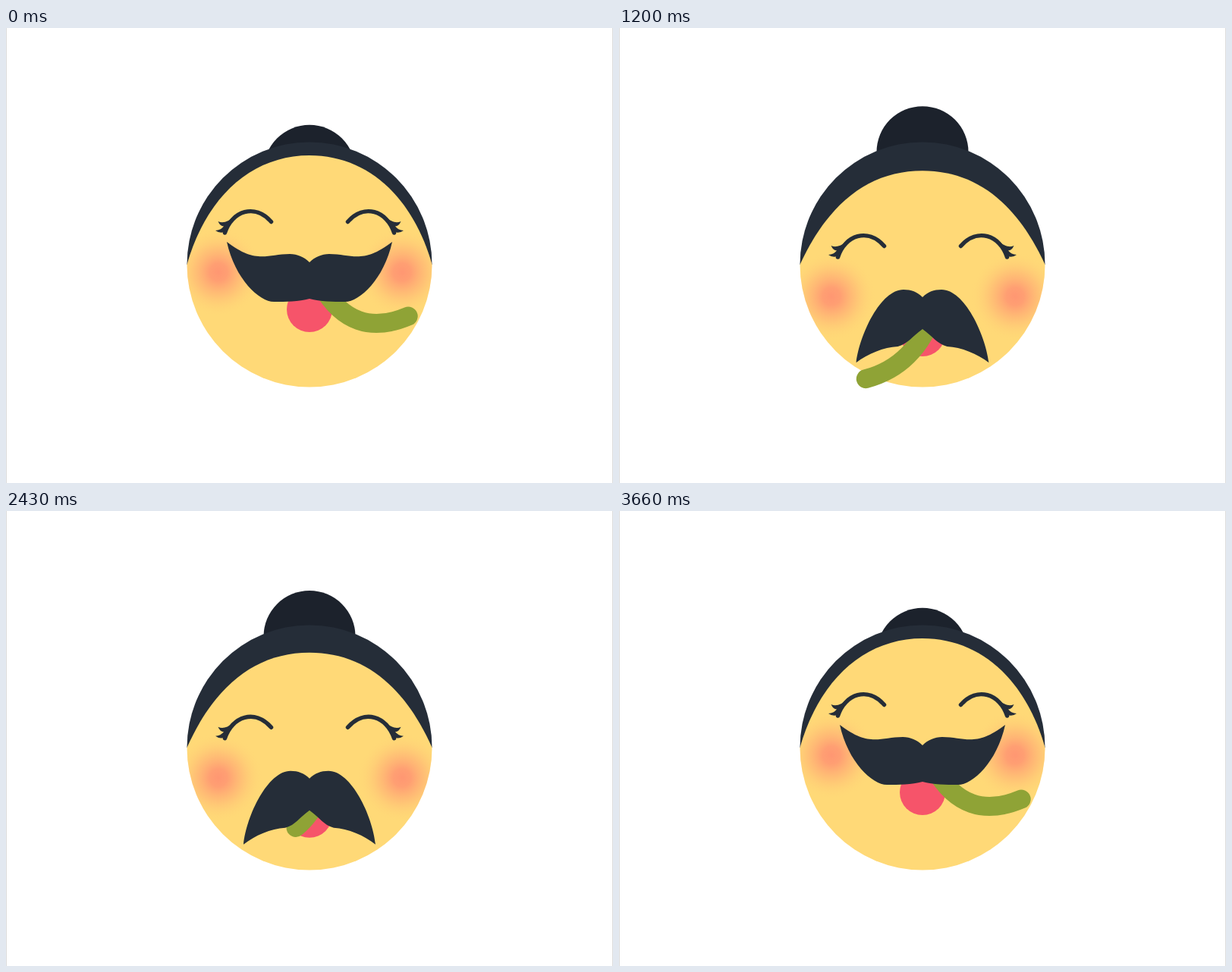
An HTML page for the animation above (3.69 s loop, 800x600 px).

```html
<!DOCTYPE html>
<html lang="en">
<head>
<meta charset="utf-8">
<title>Moustache face</title>
<style>
html, body { margin: 0; width: 100%; height: 100%; overflow: hidden; background: #fff; }
svg { display: block; width: 800px; height: 600px; }
</style>
</head>
<body>
<svg viewBox="0 0 800 600">
  <defs>
    <radialGradient id="glow">
      <stop offset="0" stop-color="#ff9772"/>
      <stop offset=".2" stop-color="#ff9772" stop-opacity=".88"/>
      <stop offset=".55" stop-color="#ffa573" stop-opacity=".42"/>
      <stop offset="1" stop-color="#ffd977" stop-opacity="0"/>
    </radialGradient>
    <clipPath id="skinClip"><path id="skinEdge"/></clipPath>
    <g id="eye">
      <path d="M288.500 270C298 241 328 231 349.500 255.500" fill="none" stroke="#252d38" stroke-width="5.500" stroke-linecap="round"/>
      <path d="M299 250Q288 259 279.500 255Q282 261 287 261.500Q283 266.500 276 267Q281 271 288 269Z" fill="#252d38"/>
    </g>
  </defs>
  <path d="M.5 0V600M799.500 0V600" stroke="#dcdcdc"/>
  <circle id="bun" cx="400" cy="188.300" r="60.500" fill="#1c222c"/>
  <path d="M238.500 312A161.500 161.500 0 0 1 561.500 312Z" fill="#252d38"/>
  <path id="skin" fill="#ffd977"/>
  <g clip-path="url(#skinClip)">
    <g id="blush" fill="url(#glow)">
      <circle cx="280" cy="322" r="59"/>
      <circle cx="522" cy="322" r="59"/>
    </g>
  </g>
  <g id="features">
    <use href="#eye"/>
    <use href="#eye" transform="matrix(-1 0 0 1 800 0)"/>
    <circle cx="400" cy="371" r="30" fill="#f6546a"/>
    <path id="stalk" pathLength="1" fill="none" stroke="#8fa336" stroke-width="25" stroke-linecap="round"/>
    <path id="moustache" fill="#252d38"/>
  </g>
</svg>
<script>
const LOOP = 3690, SPAN = 3660, BEAT = 915, STEP = 30;
const $ = id => document.getElementById(id);
const mix = (a, b, k) => a + (b - a) * k;
const wave = (t, period) => Math.cos(2 * Math.PI * t / period);

// Smooth step from 0 to 1 between two times.
function ease(t, from, to) {
  const x = Math.min(1, Math.max(0, (t - from) / (to - from)));
  return x * x * (3 - 2 * x);
}

// Key points of half a moustache, measured from the middle of the face.
const smile = { lobe: [26, 298], brow: [70, 312], tip: [109, 282], belly: [98, 332], low: [46, 361] };
const wide = { lobe: [28, 308], brow: [66, 336], tip: [107, 370], belly: [88, 374], low: [50, 381] };
const sad = { lobe: [25, 313], brow: [83, 372], tip: [87, 410], belly: [72, 398], low: [32, 388] };

// 0 smiles, 1 is wide, 2 droops; the last beat droops more slowly.
function mood(t) {
  const x = t % BEAT, last = t >= 3 * BEAT;
  const rise = last ? ease(x, 60, 450) : ease(x, 50, 300);
  return 2 * Math.min(rise, 1 - ease(x, 600, 842));
}

function moustache(m) {
  const [a, b, k] = m < 1 ? [smile, wide, m] : [wide, sad, m - 1];
  const at = name => a[name].map((v, i) => mix(v, b[name][i], k));
  const [lobe, brow, tip, belly, low] = ["lobe", "brow", "tip", "belly", "low"].map(at);
  const notch = 309 + 7 * m, chin = 357 + 4 * m;
  const half = [
    [0, notch], [7, notch - 7], [lobe[0] - 10, lobe[1]], lobe,
    [lobe[0] + 30, lobe[1]], brow, tip,
    belly, [low[0] + 19, low[1] + 1], low,
    [low[0] - 14, low[1] - 2 * m], [14, chin + 4 + 3 * m], [0, chin]
  ];
  const left = half.map(([x, y]) => [400 - x, y]);
  const right = half.map(([x, y]) => [400 + x, y]).reverse();
  return `M${left[0]}C${left.slice(1).join(" ")}C${right.slice(1).join(" ")}Z`;
}

// The stalk swings once every two beats and lingers at both sides.
function stalk(t) {
  const swing = Math.sin(Math.PI / 2 * wave(t + 40, 2 * BEAT));
  const angle = 1.234 * swing, side = Math.abs(swing);
  const polar = (a, r) => [416 + r * Math.sin(a), 340 + r * Math.cos(a)];
  return `M416 340Q${polar(0.42 * angle, 70 + 12 * side)} ${polar(angle, 141 - 20 * side)}`;
}

function draw(t) {
  const dy = 21.2 * (0.987 - wave(t + 24, BEAT));
  const hair = 0.63 * dy, top = 168 + hair;
  const x1 = 264 + 0.6 * hair, y1 = 222 + 0.4 * hair, x2 = 324 + 0.3 * hair;
  const skin = `M238.500 312C${x1} ${y1} ${x2} ${top} 400 ${top}` +
    `S${800 - x1} ${y1} 561.500 312A161.500 161.500 0 0 1 238.500 312Z`;
  $("skin").setAttribute("d", skin);
  $("skinEdge").setAttribute("d", skin);
  $("bun").setAttribute("cy", 188.3 - 0.77 * dy);
  for (const id of ["blush", "features"]) $(id).setAttribute("transform", `translate(0 ${dy})`);

  // Slurped in, then pushed out again.
  const shown = Math.max(1 - ease(t, 2160, 2660), ease(t, 2730, 3230));
  $("stalk").setAttribute("d", stalk(t));
  $("stalk").setAttribute("stroke-dasharray", shown < 1 ? `${shown} 2` : "none");
  $("moustache").setAttribute("d", moustache(mood(t)));
}

const start = performance.now();
function tick() {
  const t = (performance.now() - start) % LOOP;
  draw(Math.min(SPAN, Math.floor(t / STEP) * STEP));
  requestAnimationFrame(tick);
}
tick();
</script>
</body>
</html>
```
